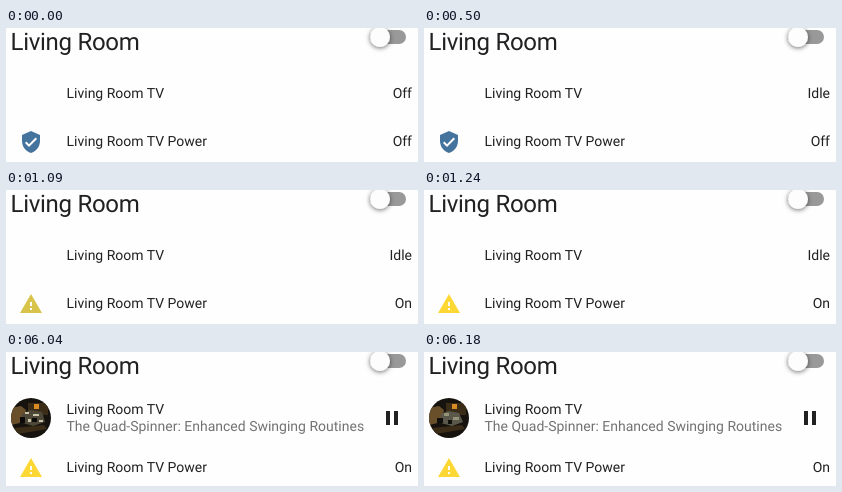
An HTML page that plays this animation: 412 px wide and 134 px high, repeating every 8000 ms.

```html
<!DOCTYPE html>
<html lang="en">
<head>
<meta charset="utf-8">
<title>Living Room card</title>
<style>
  html, body { margin: 0; width: 100%; height: 100%; overflow: hidden; background: #fefefe; }
  svg { display: block; width: 412px; height: 134px; }
  text { font: 14px Roboto, sans-serif; fill: #212121; text-rendering: geometricPrecision; }
  .title { font-size: 24px; letter-spacing: -.012em; }
  .secondary { fill: #727272; }
  .end { text-anchor: end; }

  .step { animation: 8s step-end infinite; }
  .tv-off { animation-name: tv-off; }
  .idle { animation-name: idle; }
  .power-off { animation-name: power-off; }
  .power-on { animation-name: power-on; }
  .playing { animation-name: playing; }
  .app { animation-name: app; }
  .media { animation-name: media; }
  .tv-name { animation-name: lift; }
  .power-row { animation-name: lower; }
  .alert { animation-name: warm; }
  .cover-a { animation-name: cover-a; }
  .cover-b { animation-name: cover-b; }

  @keyframes tv-off { 0% { visibility: visible } 6.25%, 100% { visibility: hidden } }
  @keyframes idle { 0%, 47.375%, 100% { visibility: hidden } 6.25% { visibility: visible } }
  @keyframes power-off { 0% { visibility: visible } 11.875%, 100% { visibility: hidden } }
  @keyframes power-on { 0% { visibility: hidden } 11.875%, 100% { visibility: visible } }
  @keyframes playing { 0% { visibility: hidden } 47.375%, 100% { visibility: visible } }
  @keyframes app { 0%, 75.5%, 100% { visibility: hidden } 47.375% { visibility: visible } }
  @keyframes media { 0% { visibility: hidden } 75.5%, 100% { visibility: visible } }
  @keyframes cover-a { 0%, 77.25%, 100% { visibility: hidden } 75.5% { visibility: visible } }
  @keyframes cover-b { 0% { visibility: hidden } 77.25%, 100% { visibility: visible } }
  @keyframes lift { 0% { transform: none } 47.375%, 100% { transform: translateY(-8px) } }
  @keyframes lower { 0% { transform: none } 47.375%, 100% { transform: translateY(2px) } }
  @keyframes warm { 0% { fill: #5b7f91 } 13.625% { fill: #d8c44a } 15.5%, 100% { fill: #fdd835 } }
</style>
</head>
<body>
<svg viewBox="0 0 412 134">
  <defs>
    <clipPath id="round"><circle cx="25" cy="66" r="20"/></clipPath>
    <filter id="soft"><feGaussianBlur stdDeviation=".6"/></filter>
    <filter id="shadow" x="-50%" y="-50%" width="200%" height="200%">
      <feDropShadow dx="0" dy="1" stdDeviation="2.5" flood-opacity=".6"/>
    </filter>
  </defs>

  <text class="title" x="4.5" y="22">Living Room</text>
  <rect x="364" y="2" width="36" height="14" rx="7" fill="#999"/>
  <circle cx="374" cy="9" r="10" fill="#fdfdfd" filter="url(#shadow)"/>

  <text class="step tv-name" x="60.5" y="70">Living Room TV</text>
  <text class="end step tv-off" x="406" y="70">Off</text>
  <text class="end step idle" x="406" y="70">Idle</text>
  <text class="secondary step app" x="60.5" y="79">ClipFen</text>
  <text class="secondary step media" x="60.5" y="79">The Quad-Spinner: Enhanced Swinging Routines</text>
  <path class="step playing" fill="#212121" d="M380 59h4v14h-4zM388 59h4v14h-4z"/>

  <g clip-path="url(#round)">
    <g class="step media">
      <rect x="5" y="46" width="40" height="40" fill="#16120d"/>
      <g filter="url(#soft)">
        <path fill="#69502b" d="M5 56l10-2 5 4-2 12-13 3z"/>
        <path fill="#3b2c18" d="M22 51h20v12H22zM8 76l30-3 3 4-29 5z"/>
        <path fill="#d98a22" d="M28 52h5v5h-5z"/>
      </g>
    </g>
    <g class="step cover-a" filter="url(#soft)">
      <path fill="#4d4837" d="M16 62l8-4 12 2 3 10-12 4-10-3z"/>
      <path fill="#c9c3a8" d="M19 60h4v2h-4zM27 62h6v2h-6zM22 67h3v3h-3zM33 68h4v2h-4z"/>
      <path fill="#0c0b09" d="M14 65h5v6h-5zM26 66h5v4h-5z"/>
    </g>
    <g class="step cover-b" filter="url(#soft)">
      <path fill="#59584a" d="M17 62l7-3 11 2 4 9-11 4-11-3z"/>
      <path fill="#96927a" d="M20 61h5v3h-5zM29 65h6v3h-6z"/>
      <path fill="#12100c" d="M13 66h6v5h-6zM24 68h4v4h-4z"/>
    </g>
  </g>

  <g class="step power-row">
    <path class="step power-off" transform="translate(13 102)" fill="#44739e" d="M10 17l-4-4 1.41-1.41L10 14.17l6.59-6.59L18 9M12 1L3 5v6c0 5.55 3.84 10.74 9 12 5.16-1.26 9-6.45 9-12V5z"/>
    <g class="step power-on">
      <path class="step alert" transform="translate(13 102)" d="M13 14h-2v-4h2M13 18h-2v-2h2M1 21h22L12 2z"/>
    </g>
    <text x="60.5" y="118">Living Room TV Power</text>
    <text class="end step power-off" x="406" y="118">Off</text>
    <text class="end step power-on" x="406" y="118">On</text>
  </g>
</svg>
</body>
</html>
```
